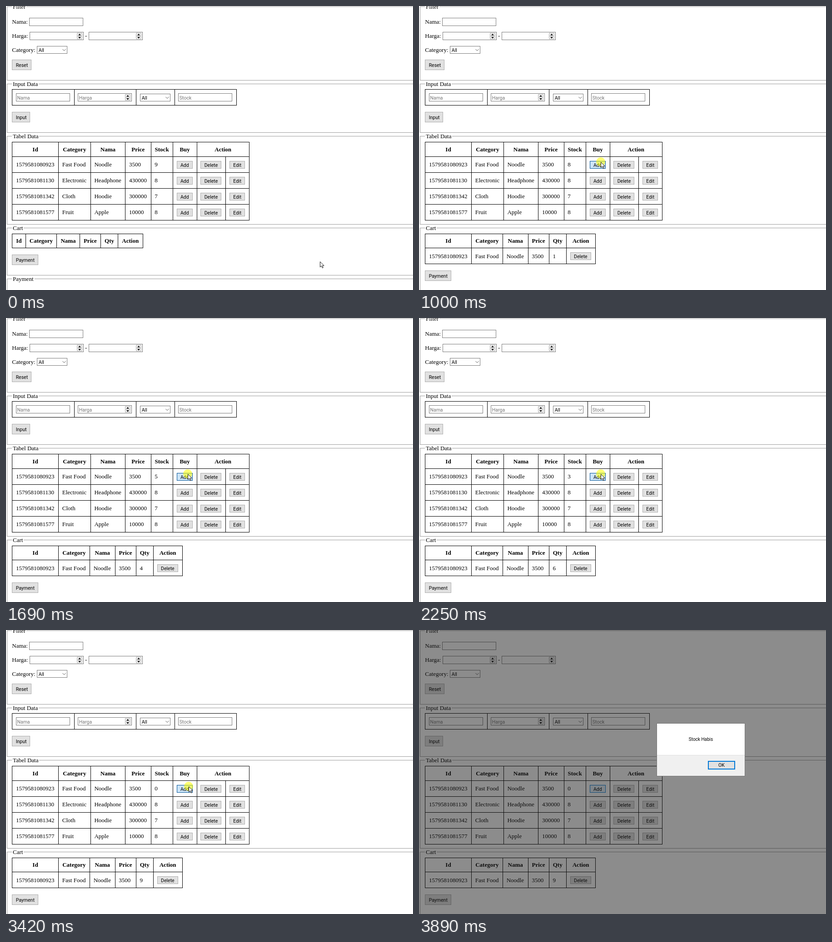
These frames come from a looping animation (896x625 px, 4520 ms). An HTML page:

```html
<!DOCTYPE html>
<html lang="id">
<head>
<meta charset="utf-8">
<title>Cart</title>
<style>
  html, body { margin: 0; width: 100%; height: 100%; overflow: hidden; background: #fff; }
  svg { display: block; width: 896px; height: 625px; }
  text { font: 13px "Liberation Serif", serif; white-space: pre; }
  .head { font-weight: bold; }
  .ui { font: 10.5px Roboto, sans-serif; }
  .hint { fill: #757575; }
  .mid { text-anchor: middle; }
  .button { fill: #e1e1e1; stroke: #adadad; }
  .hover { fill: #e5f1fb; stroke: #0078d7; }
  .active { fill: #cce4f7; stroke: #005499; }
  .field { fill: #fff; stroke: #7a7a7a; }
</style>
</head>
<body>
<svg id="stage" viewBox="0 0 896 625"></svg>
<script>
const LEFT = 13.3, PAD = 8.65, SPACE = 3.25;
const HEAD_HEIGHT = 31.6, ROW_HEIGHT = 35, FIELD_WIDTH = 119.1, SELECT_WIDTH = 67.3;

const add = (parent, tag, attrs = {}, content = '') => {
  const el = document.createElementNS('http://www.w3.org/2000/svg', tag);
  for (const key in attrs) el.setAttribute(key, attrs[key]);
  el.textContent = content;
  return parent.appendChild(el);
};
const stage = document.getElementById('stage');
const group = () => add(stage, 'g');
const label = (g, x, y, content, cls = '') => add(g, 'text', { x, y, class: cls }, content);
const fill = (g, x, y, width, height, color) => add(g, 'rect', { x, y, width, height, fill: color });
const hLine = (g, x1, x2, y, color = '#000') => fill(g, x1, y, x2 - x1 + 1, 1, color);
const vLine = (g, x, y1, y2, color = '#000') => fill(g, x, y1, 1, y2 - y1 + 1, color);
const box = (g, x, y, width, height, cls) => add(g, 'rect', {
  x: Math.round(x) + .5, y: Math.round(y) + .5,
  width: Math.round(width) - 1, height: height - 1, class: cls });

function textWidth(content, cls) {
  const probe = label(stage, 0, 0, content, cls);
  const width = probe.getComputedTextLength();
  probe.remove();
  return width;
}
const buttonWidth = content => textWidth(content, 'ui') + 16.7;

function button(g, x, y, content, height = 23) {
  const width = buttonWidth(content);
  const face = box(g, x, y, width, height, 'button');
  label(g, x + width / 2, Math.round(y) + height / 2 + 4, content, 'ui mid');
  return face;
}

function input(g, x, y, hint = '') {
  box(g, x, y, FIELD_WIDTH, 18, 'field');
  label(g, x + 2.5, y + 13.5, hint, 'ui hint');
}

function numberInput(g, x, y, hint) {
  input(g, x, y, hint);
  const left = Math.round(x) + 104, top = y + 2;
  add(g, 'path', { d: `M${left + .5} ${top + .5}h11v13h-11zM${left} ${top + 7}h12`, fill: '#f0f0f0', stroke: '#b4b4b4' });
  add(g, 'path', { d: `M${left + 3} ${top + 5.5}l3-3.5 3 3.5zM${left + 3} ${top + 9}l3 3.5 3-3.5z` });
}

function select(g, x, y) {
  box(g, x, y, SELECT_WIDTH, 17, 'field');
  label(g, x + 4, y + 12.5, 'All', 'ui');
  add(g, 'path', { d: `M${Math.round(x) + 56.5} ${y + 7}l3.5 3.5 3.5-3.5`, fill: 'none', stroke: '#555' });
}

function fieldset(g, top, bottom, legend) {
  const gray = '#9c9c9c';
  hLine(g, 2, 12, top, gray);
  hLine(g, Math.round(17 + textWidth(legend)), 896, top, gray);
  vLine(g, 2, top, bottom, gray);
  hLine(g, 2, 896, bottom, gray);
  label(g, 15, top + 5, legend);
}

// Table cells: a width for the column layout and a way to draw at the cell's padding edge
const textCell = content => ({
  width: textWidth(content), draw: (g, x, y) => label(g, x, y + 22.3, content) });
const buttonCell = content => ({
  width: buttonWidth(content), draw: (g, x, y) => button(g, x, y + 10, content, 17) });
const fieldCell = (drawField, width, offset, hint) => ({
  width, draw: (g, x, y) => drawField(g, x, y + offset, hint) });

// The last heading spans all remaining columns.
function table(g, top, heads, rows, columnCount = heads.length) {
  const edges = [LEFT];
  for (let i = 0; i < columnCount; i++) {
    const widths = rows.map(cells => cells[i].width);
    if (heads[i] && (i < heads.length - 1 || columnCount === heads.length)) widths.push(textWidth(heads[i], 'head'));
    edges.push(edges[i] + Math.max(...widths) + 2 * PAD);
  }
  const bodyTop = top + (heads.length ? HEAD_HEIGHT : 0);
  const bottom = Math.round(bodyTop + rows.length * ROW_HEIGHT);
  const right = edges[columnCount];

  hLine(g, 13, Math.round(right), Math.round(top));
  for (let i = 0; i <= rows.length; i++) hLine(g, 13, Math.round(right), Math.round(bodyTop + i * ROW_HEIGHT));
  edges.forEach((x, i) => {
    const spanned = i >= heads.length && i < columnCount;
    vLine(g, Math.round(x), Math.round(spanned ? bodyTop : top), bottom);
  });
  heads.forEach((head, i) => {
    const end = i === heads.length - 1 ? right : edges[i + 1];
    label(g, (edges[i] + end) / 2 + .3, top + 20.6, head, 'head mid');
  });
  return rows.map((cells, r) =>
    cells.map((cell, i) => cell.draw(g, edges[i] + PAD, bodyTop + r * ROW_HEIGHT)));
}

const page = group();

// Filter
const afterLabel = (content, y) => {
  label(page, LEFT, y, content);
  return LEFT + textWidth(content) + SPACE;
};
fieldset(page, 1, 163, 'Filter');
input(page, afterLabel('Nama:', 39), 26);
const minX = afterLabel('Harga:', 70), dashX = minX + FIELD_WIDTH + SPACE;
numberInput(page, minX, 57);
label(page, dashX, 70, '-');
numberInput(page, dashX + textWidth('-') + SPACE, 57);
select(page, afterLabel('Category:', 100.5), 88);
button(page, LEFT, 118, 'Reset');

// Input data
fieldset(page, 171, 278, 'Input Data');
table(page, 183, [], [[
  fieldCell(input, FIELD_WIDTH, 9, 'Nama'),
  fieldCell(numberInput, FIELD_WIDTH, 9, 'Harga'),
  fieldCell(select, SELECT_WIDTH, 10),
  fieldCell(input, FIELD_WIDTH, 9, 'Stock')
]], 4);
button(page, LEFT, 233, 'Input');

// Products
fieldset(page, 286, 480, 'Tabel Data');
const products = [
  '1579581080923|Fast Food|Noodle|3500|9',
  '1579581081130|Electronic|Headphone|430000|8',
  '1579581081342|Cloth|Hoodie|300000|7',
  '1579581081577|Fruit|Apple|10000|8'
].map(line => [...line.split('|').map(textCell), ...['Add', 'Delete', 'Edit'].map(buttonCell)]);
const [firstRow] = table(page, 299,
  ['Id', 'Category', 'Nama', 'Price', 'Stock', 'Buy', 'Action'], products, 8);
const stockText = firstRow[4], buyButton = firstRow[5];

// Cart, before and after the first purchase
function cart(rows) {
  const g = group(), shift = rows.length * ROW_HEIGHT;
  fieldset(g, 488, 592 + shift, 'Cart');
  const cells = table(g, 500.6, ['Id', 'Category', 'Nama', 'Price', 'Qty', 'Action'], rows);
  button(g, LEFT, 547 + shift, 'Payment');
  fieldset(g, 600 + shift, 700 + shift, 'Payment');
  return { g, cells };
}
const emptyCart = cart([]);
const fullCart = cart([[...products[0].slice(0, 4), textCell('1'), buttonCell('Delete')]]);
const qtyText = fullCart.cells[0][4];

// Alert
const dialog = group();
fill(dialog, 0, 0, 896, 625, 'rgba(26,26,26,.5)');
fill(dialog, 523, 205, 195, 117, '#777');
fill(dialog, 524, 206, 193, 115, '#fff');
fill(dialog, 524, 275, 193, 46, '#f0f0f0');
hLine(dialog, 524, 716, 275, '#dfdfdf');
label(dialog, 620.5, 244, 'Stock Habis', 'ui mid').style.fontSize = '10px';
add(dialog, 'rect', { x: 637, y: 289, width: 58, height: 17, fill: '#e1e1e1', stroke: '#0078d7', 'stroke-width': 2 });
label(dialog, 666, 300.5, 'OK', 'ui mid');

const pointer = group();
const spot = add(pointer, 'circle', { r: 10, fill: '#ff0', 'fill-opacity': .55 });
add(pointer, 'path', {
  d: 'M.5.8V12.6L3.3 10 5.4 14.6 7.3 13.8 5.3 9.4H9.2Z', fill: '#fff', stroke: '#000', 'stroke-width': .9 });

// Timeline in ms
const LOOP = 4520, TICK = 78, ARRIVE = 538, DRIFT = 3190, ALERT = 3490, POINTER_END = 3890;
const FIRST_RELEASE = 943, CLICK_PERIOD = 229, PRESS = 171, CLICKS = 9, LAST_PRESS = 3340;

const ease = p => p * p * (3 - 2 * p);
const glide = (from, to, p) => from.map((v, i) => Math.round(v + (to[i] - v) * ease(p)));
const progress = (elapsed, ticks) => Math.min(1, Math.floor(elapsed / TICK) / ticks);

function pointerAt(t) {
  if (t < ARRIVE) return glide([691, 562], [400, 343], progress(t + 8, 7));
  if (t < ALERT) return t < DRIFT ? [400, 343] : [402, 344];
  return glide([442, 367], [782, 609], progress(t - ALERT, 4));
}

function clickAt(t) {
  const sinceFirstPress = t - FIRST_RELEASE + PRESS;
  const index = Math.floor(sinceFirstPress / CLICK_PERIOD);
  const inSeries = index >= 0 && index < CLICKS && sinceFirstPress - index * CLICK_PERIOD < PRESS;
  const released = Math.floor((t - FIRST_RELEASE) / CLICK_PERIOD) + 1;
  return {
    pressed: inSeries || (t >= LAST_PRESS && t < ALERT),
    qty: Math.max(0, Math.min(CLICKS, released))
  };
}

const show = (el, on) => el.setAttribute('display', on ? 'inline' : 'none');

function draw(t) {
  const { pressed, qty } = clickAt(t);
  pointer.setAttribute('transform', `translate(${pointerAt(t)})`);
  show(pointer, t < POINTER_END);
  show(spot, pressed);
  show(emptyCart.g, qty === 0);
  show(fullCart.g, qty > 0);
  show(dialog, t >= ALERT);
  stockText.textContent = CLICKS - qty;
  qtyText.textContent = qty;
  const look = t < ARRIVE ? '' : pressed ? ' active' : ' hover';
  buyButton.setAttribute('class', 'button' + look);
}

const start = performance.now();
function tick() {
  draw((performance.now() - start) % LOOP);
  requestAnimationFrame(tick);
}
tick();
</script>
</body>
</html>
```
